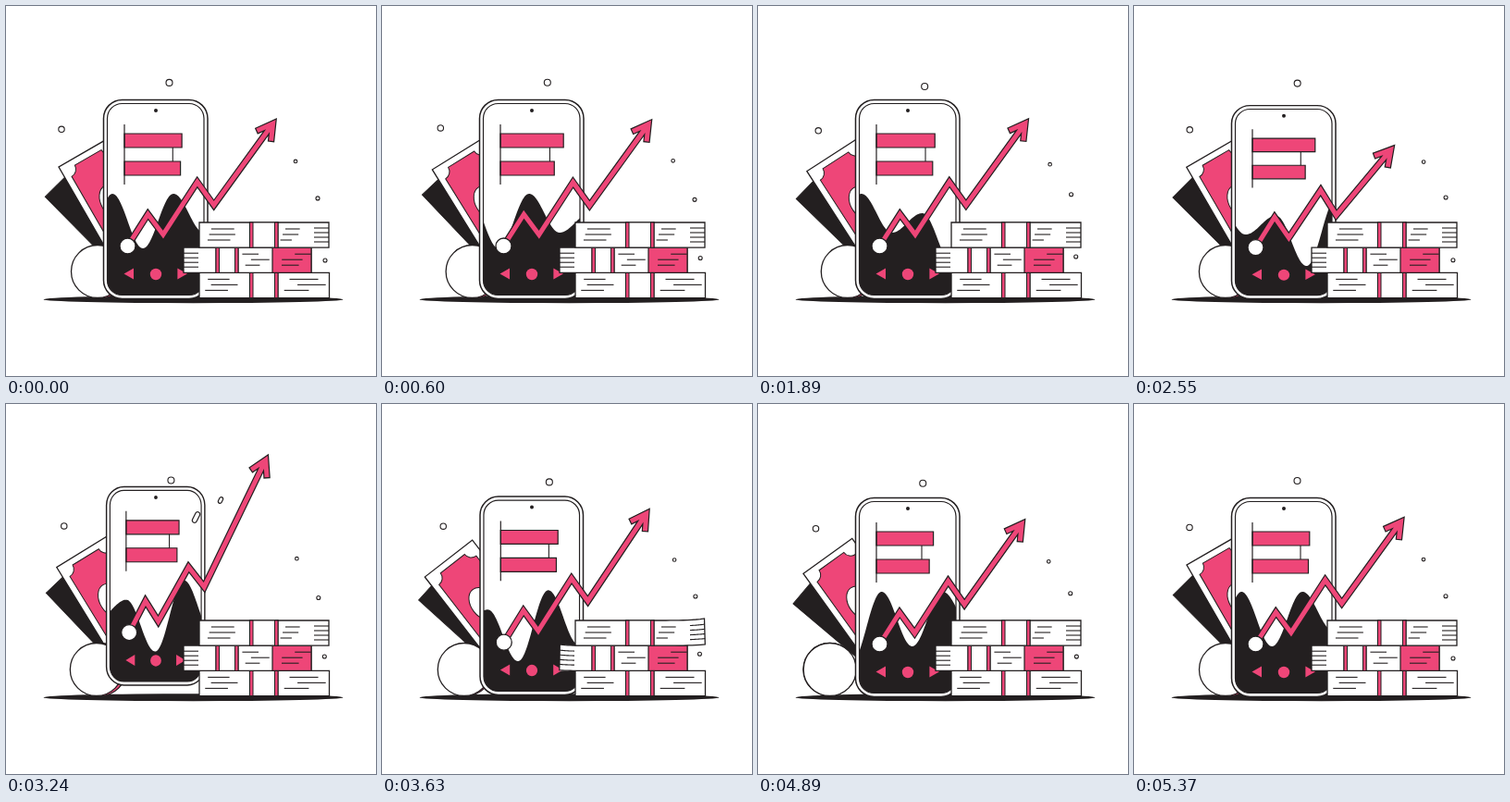
Animation, 400 px wide and 400 px high, one loop 5400 ms. Source, as an HTML page with a canvas:

```html
<!DOCTYPE html>
<html lang="en">
<head>
<meta charset="utf-8">
<title>Growing savings</title>
<style>
  html, body { margin: 0; width: 100%; height: 100%; overflow: hidden; background: #fff; }
  canvas { display: block; width: 400px; height: 400px; }
</style>
</head>
<body>
<canvas id="stage"></canvas>
<script>
const LOOP = 5400, STEP = 30, TAU = Math.PI * 2;
const INK = '#231f20', PINK = '#ee4678', WHITE = '#fff';
const canvas = document.getElementById('stage');
const ratio = window.devicePixelRatio || 1;
canvas.width = canvas.height = 400 * ratio;
const c = canvas.getContext('2d');

// Motion rules
const clamp = u => Math.min(1, Math.max(0, u));
const ease = u => { u = clamp(u); return u * u * (3 - 2 * u); };
const between = (t, from, to) => (t - from) / (to - from);
const wave = (t, period, peak) => Math.cos(TAU * (t - peak) / period);
const hump = (t, from, peak, to) => t < peak ? ease(between(t, from, peak)) : 1 - ease(between(t, peak, to));

const squat = t => 1.18 * hump(t, 2250, 2640, 2940) + .6 * hump(t, 3600, 3720, 3960);
const jump = t => 1.05 * (t < 3290 ? ease(between(t, 2880, 3290)) : 1 - clamp(between(t, 3290, 3660)) ** 2);
// The landing blows things aside; each settles at its own pace.
const gust = (t, hold, end) => ease(between(t, 3480, 3900)) * (1 - ease(between(t, hold, end)));

// Drawing helpers
function paint(fill, width = 1.3) {
  if (fill) { c.fillStyle = fill; c.fill(); }
  if (width) { c.strokeStyle = INK; c.lineWidth = width; c.stroke(); }
}
function circle(x, y, r, fill, width) {
  c.beginPath();
  c.arc(x, y, r, 0, TAU);
  paint(fill, width);
}
function box(x, y, w, h, fill, width) {
  c.beginPath();
  c.rect(x, y, w, h);
  paint(fill, width);
}
function roundBox(x, y, w, h, r, fill, width) {
  c.beginPath();
  c.roundRect(x, y, w, h, r);
  paint(fill, width);
}
function line(x1, y1, x2, y2, width = 1.1) {
  c.beginPath();
  c.moveTo(x1, y1);
  c.lineTo(x2, y2);
  paint(null, width);
}
function saved(draw) {
  c.save();
  draw();
  c.restore();
}
function spin(x, y, degrees) {
  c.translate(x, y);
  c.rotate(degrees * Math.PI / 180);
}

function drawBills(t) {
  const blown = gust(t, 4400, 5160);
  const swing = (degrees, x, y, lean, draw) => saved(() => {
    spin(147, 259, degrees);
    c.translate(-147, -259);
    spin(x, y, lean);
    draw();
  });
  const darkTurn = -.7 + 1.2 * wave(t, 2700, 675) - 14 * blown;
  const paleTurn = -2.2 * (1 - wave(t, 2700, 0)) - 15 * blown;
  swing(darkTurn, 43, 205, -44, () => box(0, 0, 65, 130, INK, 1));
  swing(paleTurn, 57, 174, -30, () => {
    const w = 65, h = 130, inset = 7, scoop = 9;
    box(0, 0, w, h, WHITE);
    // Panel with scooped corners
    c.beginPath();
    [[inset, inset], [w - inset, inset], [w - inset, h - inset], [inset, h - inset]].forEach(([x, y], i) =>
      c.arc(x, y, scoop, (i + 1) * TAU / 4, i * TAU / 4, true));
    c.closePath();
    paint(PINK, 1);
    c.beginPath();
    c.ellipse(w / 2, 62, 13.5, 19.5, 0, 0, TAU);
    paint(WHITE, 1);
  });
}

function drawCoin(t) {
  const x = 97.3 + 1.7 * wave(t, 2700, 0) - 26 * gust(t, 4680, 5370);
  const rim = (x - 79) / 5;
  circle(x + rim, 287, 28.5, PINK);
  circle(x, 287, 28.5, WHITE);
}

function phoneFrame(t) {
  const s = squat(t), j = jump(t);
  const top = 101.5 + 6 * s - 12 * j, bottom = 316.5 - 12.5 * j;
  return { sx: 1 - .055 * j, sy: (bottom - top) / 215, bottom };
}

// Hills scroll left through a repeating run of uneven crests and troughs.
function hillHeight(x, t) {
  const turns = [203, 245, 224, 280, 203, 262], half = 33;
  const u = (x - 181) / half + turns.length * t / LOOP + turns.length;
  const i = Math.floor(u);
  const from = turns[i % turns.length], to = turns[(i + 1) % turns.length];
  return from + (to - from) * (1 - Math.cos((u - i) * Math.PI)) / 2;
}

function drawPhone(t) {
  const f = phoneFrame(t);
  saved(() => {
    c.translate(161.5, f.bottom);
    c.scale(f.sx, f.sy);
    c.translate(-161.5, -316.5);
    roundBox(105.5, 101.5, 112.5, 215, 20, WHITE, 1.5);
    roundBox(109.5, 105.5, 104.5, 207, 16, WHITE, 1.2);
    saved(() => {
      c.clip();
      c.beginPath();
      c.moveTo(108, 320);
      for (let x = 108; x <= 216; x++) c.lineTo(x, hillHeight(x, t));
      c.lineTo(216, 320);
      paint(INK, 0);
    });
    circle(162, 113, 2, INK, 0);

    const link = 179.6 + 2.6 * wave(t, 1800, 375);
    box(128, 138, 64.3 + 3.9 * wave(t, 1800, 620), 15, PINK, 1.2);
    box(128, 168, 58.5 + 2.3 * wave(t, 1800, 120), 15, PINK, 1.2);
    line(link, 153, link, 168);
    line(128, 128, 128, 193, 1.2);

    for (const side of [-1, 1]) {
      c.beginPath();
      c.moveTo(161.7 + side * 34.2, 289.5);
      c.lineTo(161.7 + side * 23.7, 283.5);
      c.lineTo(161.7 + side * 23.7, 295.5);
      paint(PINK, 0);
    }
    circle(162, 290, 6.2, PINK, 0);
  });
}

function drawArrow(t) {
  const f = phoneFrame(t), s = squat(t), j = jump(t);
  const sway = (1 - wave(t, 1800, 240)) / 2, push = gust(t, 4400, 5160);
  // Points follow the phone and bend more towards the tip.
  const place = ([x, y]) => {
    const k = (x - 131.5) / 161.5;
    return [
      161.5 + (x - 161.5) * f.sx - 9 * k * s - 24 * k * (1 - k) * j - 3 * k * sway - 4 * k ** 3 * push,
      f.bottom + (y - 316.5) * f.sy + 21 * k * k * s - 56 * k ** 4 * j + 3.2 * k * sway
    ];
  };
  const shaft = [[131.5, 259.5], [153.5, 225], [170, 247], [207, 190], [225, 215], [293.5, 120.5]].map(place);
  const [end, tip] = shaft.slice(-2);
  const angle = Math.atan2(tip[1] - end[1], tip[0] - end[0]);
  const from = (p, a, d) => [p[0] + Math.cos(a) * d, p[1] + Math.sin(a) * d];
  const neck = from(tip, angle, -7.5);
  shaft[shaft.length - 1] = neck;
  const stroke = (color, width, reach) => {
    const barb = side => from(neck, angle + Math.PI + side * .52, reach);
    c.strokeStyle = color;
    c.lineWidth = width;
    c.beginPath();
    for (const path of [shaft, [barb(1), neck, barb(-1)]]) {
      path.forEach(([x, y], i) => i ? c.lineTo(x, y) : c.moveTo(x, y));
    }
    c.stroke();
  };
  stroke(INK, 7.4, 20);
  stroke(PINK, 5, 18.8);
  circle(...shaft[0], 8.5, WHITE);
}

// Short horizontal strokes with seeded lengths and places
function hatch(left, right, top, seed) {
  const random = n => Math.abs(Math.sin(seed * 12.9 + n * 78.2) * 437.5) % 1;
  for (let i = 0; i < 3; i++) {
    const len = (right - left) * (.4 + .25 * random(i));
    const x = left + (right - left - len) * random(i + 5), y = top + 7 + 6 * i;
    line(x, y, x + len, y);
  }
}

// The free end of a bundle fans upward.
function looseEnd(root, tip, top, height, lift) {
  const side = Math.sign(tip - root);
  const curve = (x1, x2, dy) => {
    for (let i = 0; i <= 12; i++) {
      const x = x1 + (x2 - x1) * i / 12;
      const rise = lift * between(x, root, tip) ** 4 * (1 - .4 * dy / height);
      c.lineTo(x + side * rise * (dy / height - .5) * .5, top + dy - rise);
    }
  };
  c.beginPath();
  curve(root, tip, 0);
  curve(tip, root, height);
  paint(WHITE);
  for (let dy = 6; dy < height - 3; dy += 5) {
    c.beginPath();
    curve(tip - side * 16, tip, dy);
    paint(null, 1.1);
  }
}

function band(x, y, w, h) {
  box(x, y, w, h, WHITE, 1.2);
  for (const edge of [x, x + w - 3.5]) box(edge, y, 3.5, h, PINK, 1);
}

function drawStacks(t) {
  const lift = 7 * gust(t, 4250, 4650), h = 27.2;
  const [top, middle, base] = [0, 1, 2].map(i => 234 + i * h);

  box(209, base, 140.5, h, WHITE);
  hatch(210, 260, base, 1);
  hatch(296, 349, base, 2);
  band(263.5, base, 30.5, h);

  box(192, middle, 138, h, WHITE, 0);
  box(227, middle, 103, h, WHITE);
  looseEnd(227, 192, middle, h, lift * .6);
  hatch(251, 287, middle, 3);
  box(288, middle, 42, h, PINK, 1.2);
  hatch(294, 330, middle, 4);
  band(227, middle, 24, h);

  box(209, top, 85, h, WHITE);
  hatch(209, 258, top, 5);
  looseEnd(293, 349, top, h, lift);
  hatch(296, 326, top, 6);
  band(263.5, top, 30.5, h);
}

function drawBubbles(t) {
  const drift = (x, y, r, dx, dy, lead) =>
    circle(x + dx * wave(t, 2700, 0), y + dy * Math.cos(TAU * t / 2700 + lead), r, WHITE, 1.1);
  drift(64, 133.4, 3.2, -4, 1.5, 1.6);
  drift(179.3, 84.8, 3.5, -2.8, 2.6, 2.4);
  drift(315, 169.2, 1.8, -2, 2.1, 2.2);
  drift(338.2, 206.6, 2, -1.2, 2.9, -1.1);
  drift(344, 272, 2, 1, 3, 0);
}

function drawSparks(t) {
  const u = between(t, 3060, 3420);
  if (u <= 0 || u >= 1) return;
  const grow = Math.sin(u * Math.PI), shift = (u - .5) * 36;
  const spark = (x, y, len, w) => saved(() => {
    spin(x, y, -63);
    roundBox(shift - len * grow / 2, -w * grow / 2, len * grow, w * grow, w * grow / 2, WHITE, 1.2);
  });
  spark(205.5, 122.5, 12.5, 5);
  spark(232, 104, 7, 4);
}

function draw(t) {
  c.setTransform(ratio, 0, 0, ratio, 0, 0);
  c.fillStyle = WHITE;
  c.fillRect(0, 0, 400, 400);
  c.beginPath();
  c.ellipse(202.5, 317.2, 162, 4, 0, 0, TAU);
  paint(INK, 0);
  drawBills(t);
  drawCoin(t);
  drawPhone(t);
  drawArrow(t);
  drawSparks(t);
  drawBubbles(t);
  drawStacks(t);
}

const begin = performance.now();
function tick() {
  const t = (performance.now() - begin) % LOOP;
  draw(Math.floor(t / STEP) * STEP);
  requestAnimationFrame(tick);
}
tick();
</script>
</body>
</html>
```
